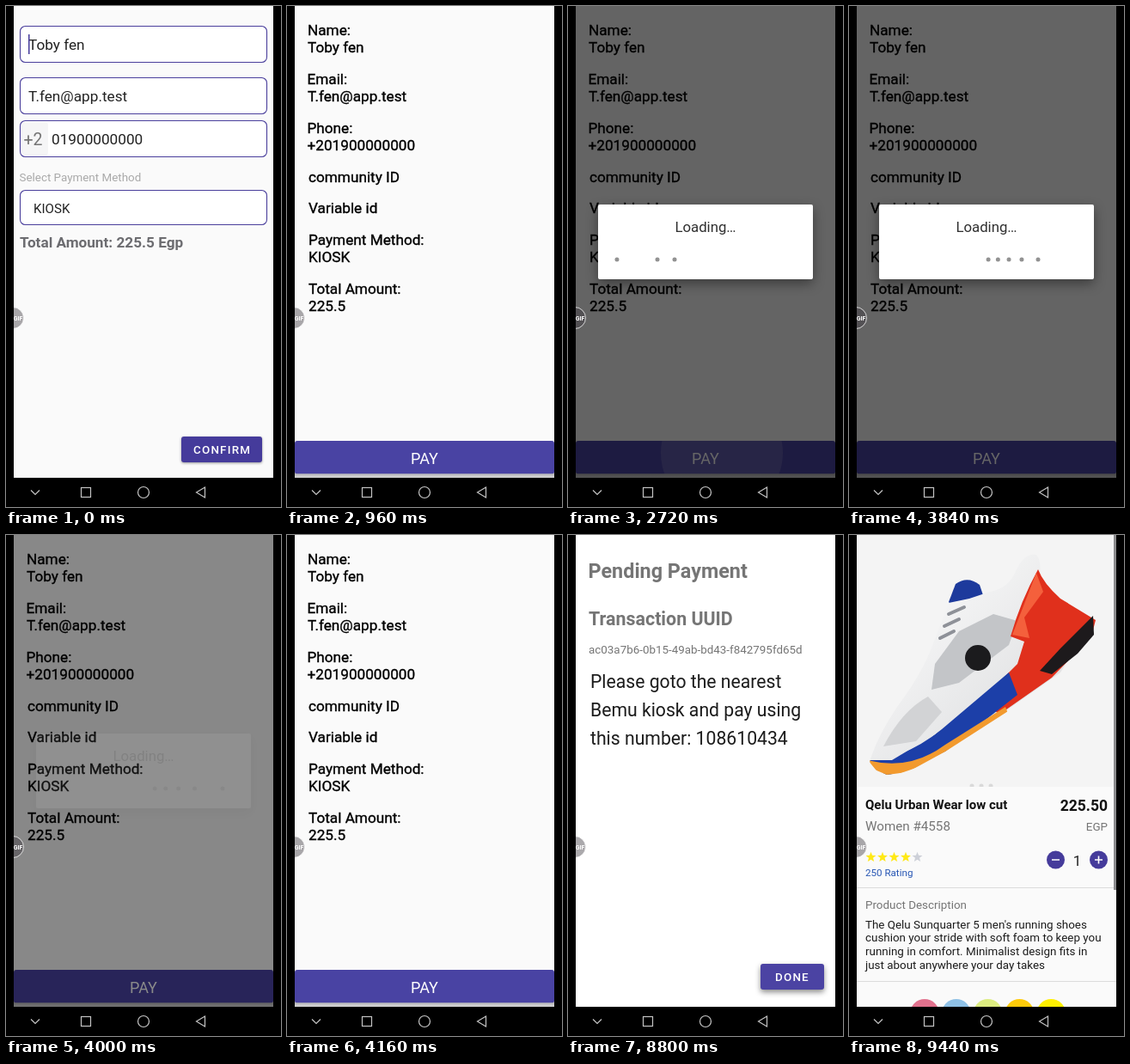
An HTML page that plays this animation: 320 by 583 pixels, repeating every 9600 ms.

```html
<!DOCTYPE html>
<html lang="en">
<head>
<meta charset="utf-8">
<title>Checkout flow</title>
<style>
  html, body { margin: 0; width: 100%; height: 100%; overflow: hidden; background: #000; }
  svg { display: block; width: 320px; height: 583px; font-family: Roboto, sans-serif; }
  text { white-space: pre; }
  .field rect { fill: #fff; stroke: #4a3f9c; stroke-width: 1.1; }
  .body { font-size: 17.2px; fill: #222; }
  .review { font-size: 17.2px; fill: #000; stroke: #000; stroke-width: .35; }
  .small { font-size: 13.4px; }
  .grey { fill: #757575; }
  .bold { font-weight: 700; }
  .button { filter: drop-shadow(0 1px 1.5px rgba(0,0,0,.4)); }
  .button.pressed { filter: drop-shadow(0 3px 3px rgba(0,0,0,.45)); }
  .button rect { fill: #453b9b; }
  .button.pressed rect { fill: #4b43a3; }
  .button text { font-size: 13.4px; font-weight: 500; letter-spacing: 1.2px; fill: #fff; }
  #dialog { filter: drop-shadow(0 5px 7px rgba(0,0,0,.4)); }
</style>
</head>
<body>
<svg viewBox="0 0 320 583">
  <defs>
    <clipPath id="screenClip"><rect x="9" width="302" height="549"/></clipPath>
    <clipPath id="payClip"><rect x="9" y="506" width="302" height="38.5" rx="3"/></clipPath>
    <clipPath id="soleClip"><path d="M24 262L50 262L100 232L160 180L215 118L286 98L285 116L246 162L182 207L112 252L68 276L44 279L25 271Z"/></clipPath>
    <linearGradient id="payShade" x2="0" y2="1">
      <stop stop-color="#a9a9ad"/><stop offset="1" stop-color="#d6d6d6"/>
    </linearGradient>
    <linearGradient id="upper" x2="1" y2="1">
      <stop stop-color="#fff"/><stop offset="1" stop-color="#d5d6d8"/>
    </linearGradient>
  </defs>
  <rect width="320" height="583"/>

  <g clip-path="url(#screenClip)">
    <g id="form">
      <rect x="9" width="302" height="549" fill="#fafafa"/>
      <g class="field">
        <rect x="16.5" y="23.5" width="287" height="42" rx="6"/>
        <rect x="16.5" y="83.5" width="287" height="42" rx="6"/>
        <rect x="16.5" y="133.5" width="287" height="42" rx="6"/>
        <rect x="16.5" y="214.5" width="287" height="40" rx="6"/>
      </g>
      <rect x="18" y="135" width="31" height="39" rx="4" fill="#f5f5f6"/>
      <g class="body">
        <text x="26" y="51">Toby fen</text>
        <text x="26" y="111">T.fen@app.test</text>
        <text x="53" y="161">01900000000</text>
        <text x="32" y="241" font-size="15.1" style="font-size:15.1px">KIOSK</text>
      </g>
      <rect id="caret" x="26" y="33" width="1.5" height="23" fill="#453b9b"/>
      <text x="20.5" y="162" font-size="19.5" class="grey">+2</text>
      <text x="15.5" y="204" class="small" fill="#a9a9a9">Select Payment Method</text>
      <text x="16" y="280.5" font-size="17.2" class="bold" fill="#6c6c70">Total Amount: 225.5 Egp</text>
      <g class="button" id="confirm">
        <rect x="204" y="501" width="94" height="30" rx="3"/>
        <text x="218" y="521">CONFIRM</text>
      </g>
    </g>

    <g id="review">
      <rect x="9" width="302" height="549" fill="#fafafa"/>
      <g class="review" id="reviewText"></g>
      <rect x="9" y="542" width="302" height="7" fill="url(#payShade)"/>
      <g clip-path="url(#payClip)">
        <rect x="9" y="506" width="302" height="38.5" fill="#4943a3"/>
        <circle id="ripple" cx="179" cy="520" fill="#fff" opacity=".14"/>
      </g>
      <text x="160" y="532.5" font-size="18" fill="#fff" text-anchor="middle">PAY</text>
    </g>

    <g id="pending">
      <rect x="9" width="302" height="549" fill="#fff"/>
      <g class="grey">
        <text x="23.5" y="50" font-size="23.4" class="bold">Pending Payment</text>
        <text x="24" y="104.5" font-size="21.4" class="bold">Transaction UUID</text>
        <text x="24" y="137.5" class="small">ac03a7b6-0b15-49ab-bd43-f842795fd65d</text>
      </g>
      <g font-size="21.2" fill="#1c1c1c">
        <text x="26" y="178">Please goto the nearest</text>
        <text x="26" y="211">Bemu kiosk and pay using</text>
        <text x="26" y="244">this number: 108610434</text>
      </g>
      <g class="button" id="done">
        <rect x="224" y="499" width="74" height="30" rx="3"/>
        <text x="241" y="519">DONE</text>
      </g>
    </g>

    <g id="product">
      <rect x="9" width="302" height="549" fill="#fafafa"/>
      <rect x="9" width="302" height="293" fill="#f4f4f4"/>
      <g id="shoe">
        <path d="M116 78L124 57Q138 47 152 58L158 76L128 92Z" fill="#1d3a9c"/>
        <path d="M24 264Q32 236 56 200Q86 160 98 126L116 79L140 74L164 66Q186 62 194 42Q204 20 218 23Q224 30 222 46L240 78L285 98L246 160L182 205L112 250L68 274L40 277Z" fill="url(#upper)"/>
        <path d="M100 150L128 112L168 92L196 100L186 128L128 172L96 180Z" fill="#c3c5c8"/>
        <path d="M40 246Q62 204 92 188L108 206L78 240Z" fill="#d2d3d5"/>
        <path d="M220 40Q226 56 246 74L287 99L282 118L236 166L176 208L150 196L196 150L204 124L188 118Q200 76 220 40Z" fill="#e0301c"/>
        <path d="M218 44L226 66L204 96L210 120L190 116Z" fill="#f4603c"/>
        <g clip-path="url(#soleClip)">
          <path d="M24 262Q66 260 108 226L186 160L196 186L112 252L44 281Z" fill="#1c3fa8"/>
          <path d="M22 262Q70 275 112 244L182 200L186 210L110 260L40 284Z" fill="#f29a2e"/>
        </g>
        <path d="M222 158L246 132L284 94L285 116L266 138L236 162Z" fill="#1d1a1c"/>
        <path d="M116 92L134 84M111 106L128 98M106 120L122 112" stroke="#8e9198" stroke-width="4" stroke-linecap="round"/>
        <circle cx="150" cy="143" r="15" fill="#1b1b1d"/>
      </g>
      <g fill="#d9d9d9"><circle cx="143" cy="292" r="2.5"/><circle cx="154" cy="292" r="2.5"/><circle cx="165" cy="292" r="2.5"/></g>
      <rect x="9" y="293" width="302" height="3" fill="#fafafa"/>
      <text x="19" y="319" font-size="15" class="bold" fill="#111">Qelu Urban Wear low cut</text>
      <text x="301" y="321" font-size="17.5" class="bold" fill="#111" text-anchor="end">225.50</text>
      <text x="19" y="343.5" font-size="15.2" class="grey">Women #4558</text>
      <text x="301" y="344" class="small grey" text-anchor="end">EGP</text>
      <g id="stars"></g>
      <text x="19" y="397" font-size="11.6" fill="#2857b4">250 Rating</text>
      <g fill="#453b9b"><circle cx="240.5" cy="378" r="10.5"/><circle cx="290.5" cy="378" r="10.5"/></g>
      <path d="M236 378H245M286 378H295M290.5 373.5V382.5" stroke="#fff" stroke-width="1.6"/>
      <text x="265.5" y="384.5" font-size="17" fill="#222" text-anchor="middle">1</text>
      <path d="M9 410.5H311M9 519.5H311" stroke="#dcdcdc"/>
      <text x="19" y="435" class="small grey">Product Description</text>
      <g class="small" fill="#1c1c1c">
        <text x="19" y="457.5">The Qelu Sunquarter 5 men's running shoes</text>
        <text x="19" y="473.2">cushion your stride with soft foam to keep you</text>
        <text x="19" y="489">running in comfort. Minimalist design fits in</text>
        <text x="19" y="504.7">just about anywhere your day takes</text>
      </g>
      <g id="swatches"></g>
      <rect x="308" width="3" height="413" fill="#8b8b8d"/>
    </g>

    <rect id="dim" x="9" width="302" height="549"/>
    <g id="dialog">
      <rect x="35" y="231" width="250" height="87" rx="2" fill="#fff"/>
      <text x="160" y="262.5" font-size="16.8" fill="#303030" text-anchor="middle">Loading…</text>
      <g id="dots" fill="#929292"></g>
    </g>

    <circle cx="8" cy="363" r="12.5" fill="rgba(60,55,62,.43)" stroke="#fff" stroke-opacity=".75"/>
    <text x="14" y="365.7" font-size="7" class="bold" fill="#fff" text-anchor="middle">GIF</text>
  </g>

  <g fill="none" stroke="#c4c4c4" stroke-width="1.2">
    <path d="M29 563.5L34 568.5L39 563.5"/>
    <rect x="87.5" y="560.5" width="11" height="11"/>
    <circle cx="160" cy="566" r="6.5"/>
    <path d="M221.5 566L231.5 560V572Z"/>
  </g>
</svg>

<script>
const LOOP = 9600, TICK = 160;
const $ = id => document.getElementById(id);

function add(parent, tag, attrs, text = '') {
  const el = document.createElementNS('http://www.w3.org/2000/svg', tag);
  for (const k in attrs) el.setAttribute(k, attrs[k]);
  el.textContent = text;
  return parent.appendChild(el);
}

const lines = [
  [24, 34, 'Name:'], [24, 54, 'Toby fen'],
  [23.5, 91, 'Email:'], [24, 111, 'T.fen@app.test'],
  [23.5, 148, 'Phone:'], [23.5, 168, '+201900000000'],
  [25, 205, 'community ID'], [25, 241, 'Variable id'],
  [25, 278, 'Payment Method:'], [25, 298, 'KIOSK'],
  [25, 335, 'Total Amount:'], [25, 355, '225.5'],
];
for (const [x, y, str] of lines) add($('reviewText'), 'text', { x, y }, str);

function star(cx, cy, r) {
  return Array.from({ length: 10 }, (_, i) => {
    const a = (i / 5 - 0.5) * Math.PI, d = i % 2 ? r * 0.42 : r;
    return `${cx + d * Math.cos(a)},${cy + d * Math.sin(a)}`;
  }).join(' ');
}
for (let i = 0; i < 5; i++) {
  add($('stars'), 'polygon', { points: star(25.5 + 13.5 * i, 375, 6.3), fill: i < 4 ? '#ffe916' : '#cdd0d8' });
}
['#e2728e', '#8fc1e6', '#dcec80', '#ffcb0a', '#fff000'].forEach((fill, i) =>
  add($('swatches'), 'circle', { cx: 88 + 36.8 * i, cy: 557, r: 17, fill }));

const dots = Array.from({ length: 5 }, () => add($('dots'), 'circle', { cy: 295, r: 2.5 }));

// Each step holds until the next; anything unset takes its default.
const steps = [
  [0, { screen: 'form', caret: 1 }],
  [160, { screen: 'form' }],
  [640, { screen: 'form', caret: 1, press: 1 }],
  [800, { screen: 'form', caret: 1, press: 1, enter: 0.6 }],
  [960, { screen: 'review' }],
  [2560, { screen: 'review', dim: 0.35, dialog: 0.6, ripple: 40 }],
  [2720, { screen: 'review', dim: 0.6, dialog: 1, ripple: 71 }],
  [2880, { screen: 'review', dim: 0.6, dialog: 1 }],
  [4000, { screen: 'review', dim: 0.46, dialog: 0.07 }],
  [4160, { screen: 'review' }],
  [5600, { screen: 'pending' }],
  [8800, { screen: 'pending', press: 1 }],
  [9440, { screen: 'product' }],
];

// Fast, slow in the middle, fast again.
const hesitate = u => u < 0.5 ? Math.sqrt(2 * u) / 2 : 1 - Math.sqrt(2 - 2 * u) / 2;

const show = (id, alpha) => {
  $(id).style.display = alpha ? '' : 'none';
  $(id).style.opacity = alpha;
};

function render(time) {
  const t = Math.floor(time / TICK) * TICK;
  const { screen, caret = 0, press = 0, enter = 0, dim = 0, dialog = 0, ripple = 0 } =
    steps.findLast(([start]) => start <= t)[1];

  for (const id of ['form', 'pending', 'product']) show(id, +(id === screen));
  show('review', screen === 'review' ? 1 : enter);
  $('review').setAttribute('transform', `translate(${enter ? 7 : 0} 0)`);
  show('caret', caret);
  show('dim', dim);
  show('dialog', dialog);
  $('ripple').setAttribute('r', ripple);
  for (const id of ['confirm', 'done']) $(id).classList.toggle('pressed', !!press);

  const run = 300.1 + (t - 2720) * 0.918;
  dots.forEach((dot, i) => {
    const u = (run - 150 * i) / 1500, on = u >= 0 && u < 1;
    dot.style.display = on ? '' : 'none';
    if (on) dot.setAttribute('cx', 55.7 + 216 * hesitate(u));
  });
}

const begin = performance.now();
function frame() {
  render((performance.now() - begin) % LOOP);
  requestAnimationFrame(frame);
}
frame();
</script>
</body>
</html>
```
